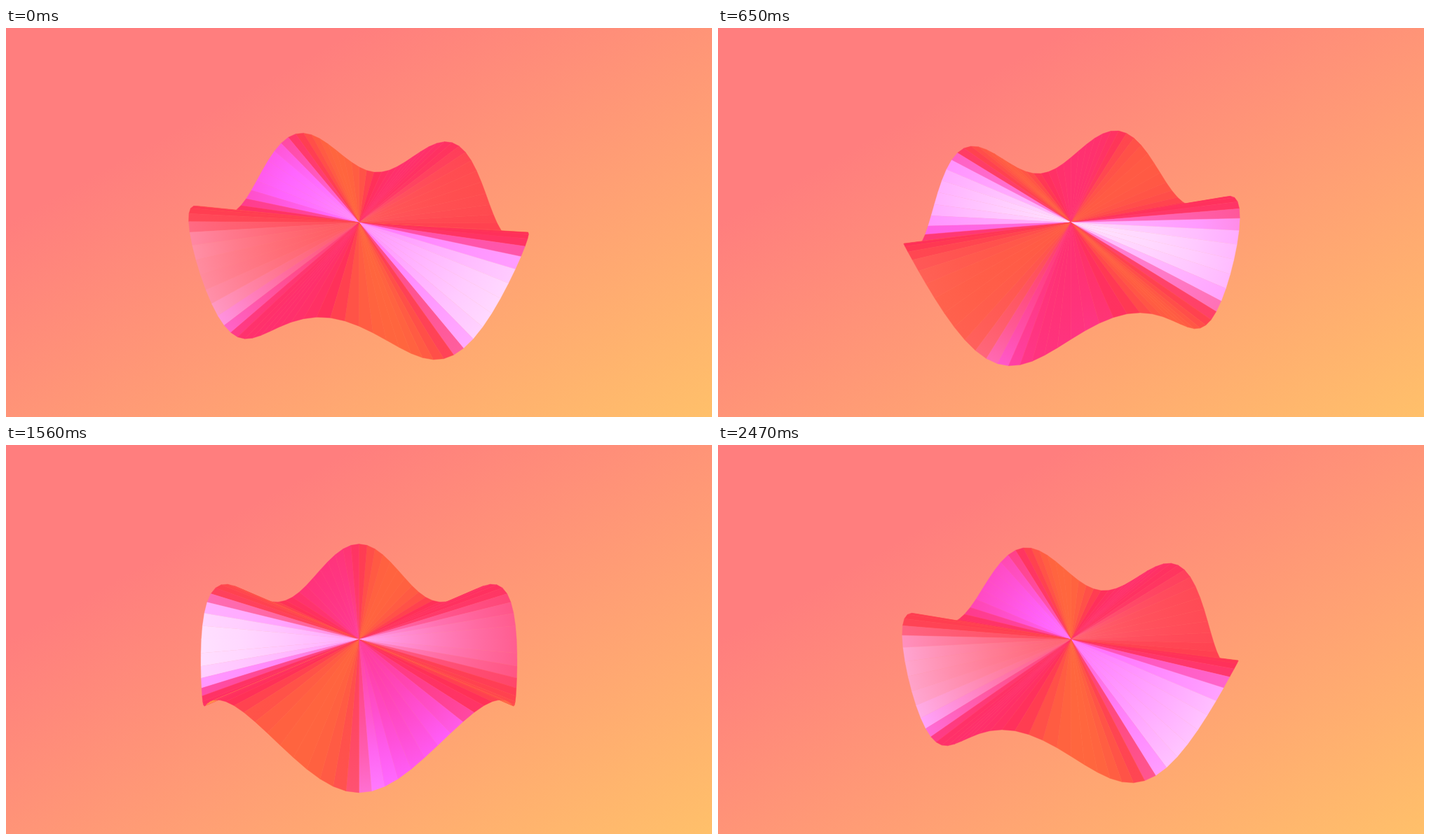
Recreate the animation shown at these times as an HTML page with a canvas. Size 1007 px wide and 556 px high, loop 2600 ms.

```html
<!DOCTYPE html>
<html lang="en">
<head>
<meta charset="utf-8">
<title>Rippling disc</title>
<style>
  html, body { margin: 0; width: 100%; height: 100%; overflow: hidden; }
  body { background: linear-gradient(to bottom right, #ff7e7e 25%, #ffc06a); }
  canvas { display: block; width: 1007px; height: 556px; }
</style>
</head>
<body>
<canvas id="stage" width="1007" height="556"></canvas>
<script>
const ctx = document.getElementById('stage').getContext('2d');
const WIDTH = 1007, HEIGHT = 556;
const LOOP = 2600, STEP = 130;
const FACETS = 100, WAVES = 5, AMPLITUDE = 0.2;
const TURN = 360 / WAVES / 23;
const RAD = Math.PI / 180;
const FOCAL = HEIGHT / 2 / Math.tan(22.5 * RAD);

// World axes: x right, y up, z toward the viewer.
const CAMERA = [0, 1.75, 2.42];
const WHITE_LIGHT = [-4.8, 6.9, 5.3];
const MAGENTA_LIGHT = [-7.5, 6.4, 1.5];

const dot = (a, b) => a[0] * b[0] + a[1] * b[1] + a[2] * b[2];
const add = (a, b) => a.map((v, i) => v + b[i]);
const sub = (a, b) => a.map((v, i) => v - b[i]);
const scale = (a, k) => a.map(v => v * k);
const unit = a => scale(a, 1 / Math.hypot(...a));
const cross = (a, b) => [
  a[1] * b[2] - a[2] * b[1],
  a[2] * b[0] - a[0] * b[2],
  a[0] * b[1] - a[1] * b[0]
];

const DISTANCE = Math.hypot(...CAMERA);
const FORWARD = scale(CAMERA, -1 / DISTANCE);
const UP = unit([0, CAMERA[2], -CAMERA[1]]);
const depthOf = p => DISTANCE + dot(p, FORWARD);

function project(p) {
  const k = FOCAL / depthOf(p);
  return [WIDTH / 2 + p[0] * k, HEIGHT / 2 - dot(p, UP) * k];
}

function rimPoint(angle, crest) {
  const a = angle * RAD;
  return [Math.sin(a), AMPLITUDE * Math.cos(WAVES * (angle - crest) * RAD), -Math.cos(a)];
}

function highlight(p, normal, light, power) {
  const half = unit(add(unit(sub(light, p)), unit(sub(CAMERA, p))));
  return Math.max(0, dot(normal, half)) ** power;
}

function shade(p, normal) {
  let green, blue;
  if (dot(normal, CAMERA) < 0) {
    green = 0.5 - 0.1 * p[0];
    blue = 0.28;
  } else {
    const white = 0.7 * highlight(p, normal, WHITE_LIGHT, 12.5);
    const magenta = 0.5 * highlight(p, normal, MAGENTA_LIGHT, 16);
    green = 0.19 + 0.3 * Math.max(0, normal[0]) + white;
    blue = 0.34 - 0.14 * normal[0] + 1.2 * white + magenta;
  }
  const byte = v => Math.round(255 * Math.min(1, v));
  return `rgb(255,${byte(green)},${byte(blue)})`;
}

function drawFacet({ a, b, mid }) {
  const normal = unit(cross(b, a));
  const center = project([0, 0, 0]);
  const paint = ctx.createLinearGradient(...center, ...project(mid));
  for (let r = 0; r <= 1; r += 0.25) paint.addColorStop(r, shade(scale(mid, r), normal));
  ctx.fillStyle = ctx.strokeStyle = paint;
  ctx.beginPath();
  ctx.moveTo(...center);
  ctx.lineTo(...project(a));
  ctx.lineTo(...project(b));
  ctx.closePath();
  ctx.fill();
  ctx.stroke();
}

// The ripple turns one wave per loop, at double pace around the seam.
function crestAngle(time) {
  const step = Math.floor((time % LOOP) / STEP);
  return (12 - step + Math.max(0, 2 - step)) * TURN;
}

function draw(time) {
  const crest = crestAngle(time);
  const facets = [];
  for (let i = 0; i < FACETS; i++) {
    const a = rimPoint(i * 360 / FACETS, crest);
    const b = rimPoint((i + 1) * 360 / FACETS, crest);
    const mid = scale(add(a, b), 0.5);
    facets.push({ a, b, mid, depth: depthOf(mid) });
  }
  facets.sort((p, q) => q.depth - p.depth);
  ctx.clearRect(0, 0, WIDTH, HEIGHT);
  ctx.lineWidth = 0.4;
  ctx.lineJoin = 'round';
  facets.forEach(drawFacet);
}

const start = performance.now();
function tick() {
  draw(performance.now() - start);
  requestAnimationFrame(tick);
}
tick();
</script>
</body>
</html>
```
